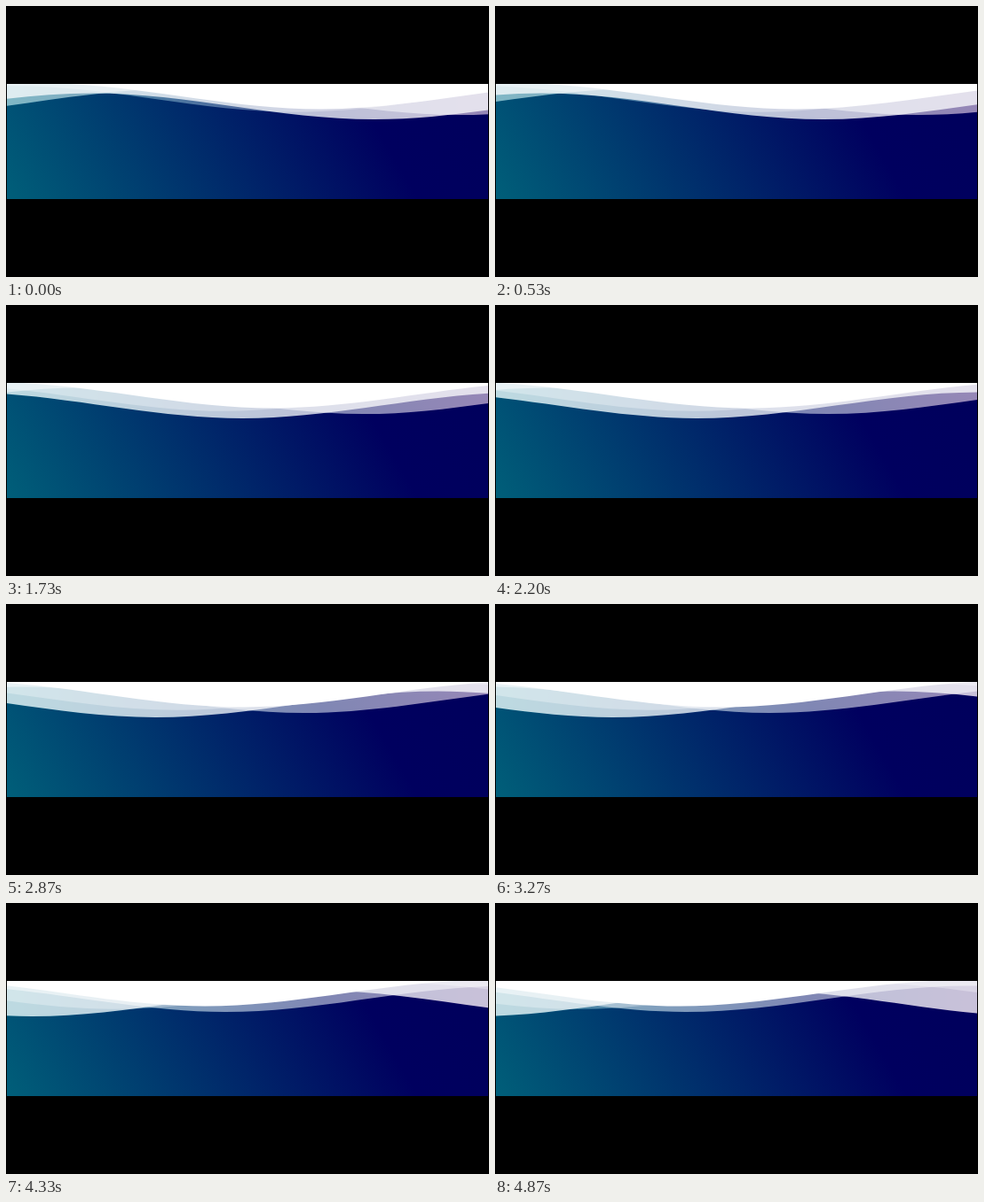
An HTML page with a canvas that plays this animation: 544x306 px, repeating every 4940 ms.

```html
<!DOCTYPE html>
<html lang="en">
<head>
<meta charset="utf-8">
<title>Waves</title>
<style>
  html, body { margin: 0; width: 100%; height: 100%; overflow: hidden; background: #000; }
  canvas { display: block; }
</style>
</head>
<body>
<canvas id="stage" width="544" height="306"></canvas>
<script>
const ctx = document.getElementById('stage').getContext('2d');
const LOOP = 4940, FPS = 15, START = 73.9;
const strip = { x: 1, y: 88, w: 542, h: 130 };

// Two periods of a swell; drawn upside down so it hangs from the top of the strip.
const swell = new Path2D('M-112 44c30 0 58-18 88-18s58 18 88 18 58-18 88-18 58 18 88 18v44h-352z');
const waves = [
  { seconds: 7,  lead: 2, drop: 0, alpha: 0.74 },
  { seconds: 10, lead: 3, drop: 3, alpha: 0.5 },
  { seconds: 13, lead: 4, drop: 5, alpha: 0.3 },
  { seconds: 20, lead: 5, drop: 7, alpha: 1 }
];

function gradient(x0, y0, x1, y1, stops) {
  const g = ctx.createLinearGradient(x0, y0, x1, y1);
  for (const [at, color] of stops) g.addColorStop(at, color);
  return g;
}
const sea = gradient(40, 287, 504, 19, [
  [0, 'rgb(0,95,121)'], [0.75, 'rgb(0,0,95)'], [1, 'rgb(0,0,92)']
]);

// The same sea as it shines through the translucent layers.
const haze = gradient(0, 0, 544, 0, [
  [0, 'rgb(0,112,140)'], [0.65, 'rgb(0,15,104)'], [1, 'rgb(45,15,110)']
]);

// cubic-bezier(.55, .5, .45, .5)
function ease(x) {
  let s = x;
  for (let i = 0; i < 5; i++) {
    const value = 1.65 * s * (1 - s) ** 2 + 1.35 * s * s * (1 - s) + s ** 3;
    const slope = 1.65 * (1 - s) ** 2 + 1.8 * s * (1 - s) * -0.333 + 1.65 * s * s;
    s -= (value - x) / slope;
  }
  return 1.5 * s * (1 - s) + s ** 3;
}

function wavePath(wave, seconds) {
  const phase = (seconds + wave.lead) / wave.seconds % 1;
  const path = new Path2D();
  const place = new DOMMatrix([-strip.w / 150, 0, 0, -1.64, 543, 170.6])
    .translate(-90 + 175 * ease(phase), wave.drop);
  path.addPath(swell, place);
  return path;
}

function draw(ms) {
  const step = Math.min(73, Math.floor((ms + 3.5) * FPS / 1000));
  const paths = waves.map(wave => wavePath(wave, START + step / FPS));

  ctx.fillStyle = '#000';
  ctx.fillRect(0, 0, 544, 306);
  ctx.save();
  ctx.beginPath();
  ctx.rect(strip.x, strip.y, strip.w, strip.h);
  ctx.clip();
  ctx.fillStyle = sea;
  ctx.fillRect(strip.x, strip.y, strip.w, strip.h);

  ctx.fillStyle = haze;
  paths.forEach(path => ctx.fill(path));
  paths.forEach((path, i) => {
    ctx.fillStyle = `rgba(255,255,255,${waves[i].alpha})`;
    ctx.fill(path);
  });
  ctx.restore();
}

const began = performance.now();
function tick() {
  draw((performance.now() - began) % LOOP);
  requestAnimationFrame(tick);
}
tick();
</script>
</body>
</html>
```
